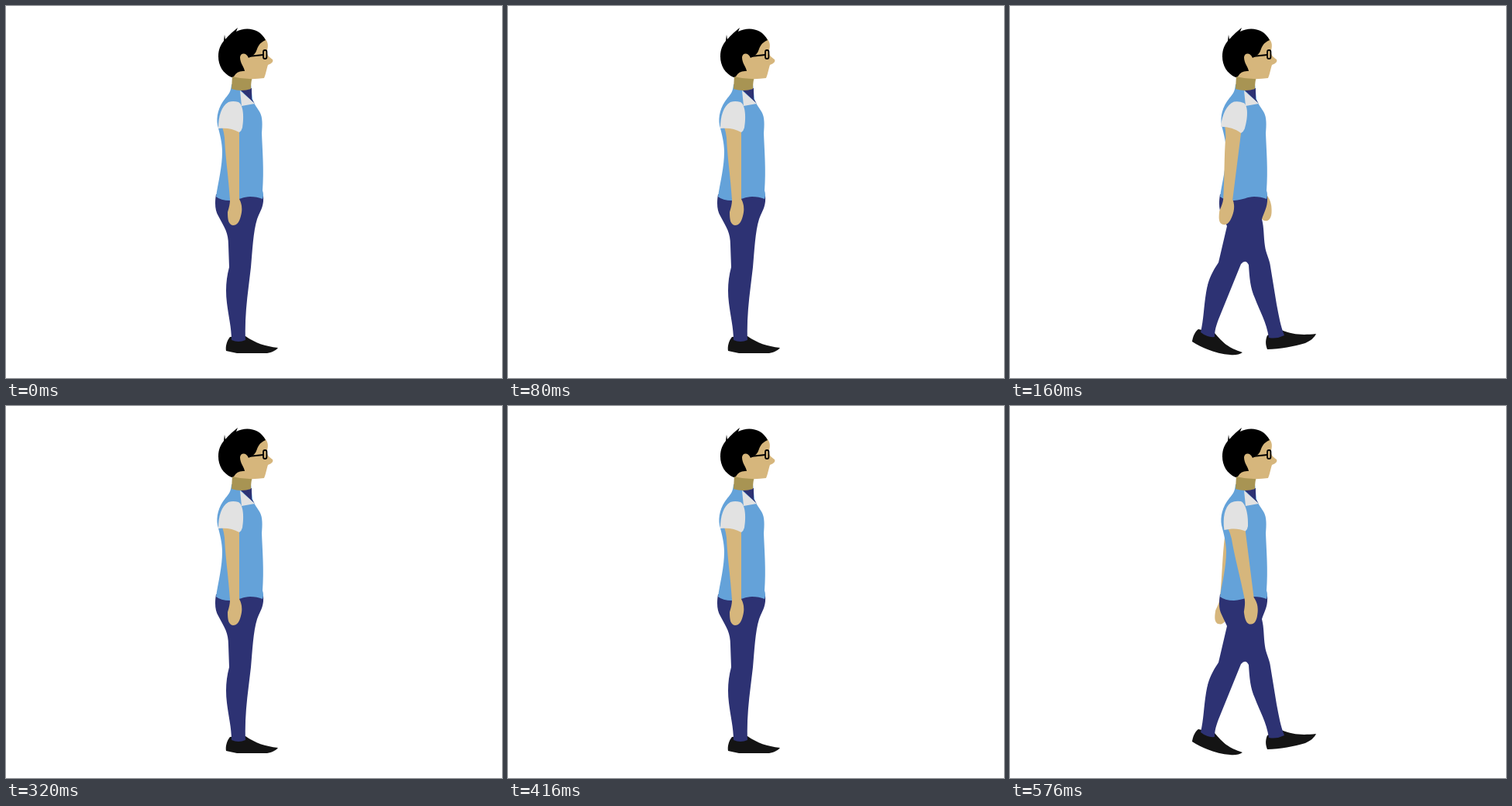
These frames come from a looping animation (640 by 480 pixels, 0.64 s). An HTML page:

```html
<!DOCTYPE html>
<html lang="en">
<head>
<meta charset="utf-8">
<title>Walking man</title>
<style>
  html, body { margin: 0; width: 100%; height: 100%; overflow: hidden; background: #fff; }
  svg { display: block; width: 100%; height: 100%; }
  .skin { fill: #d6b67c; }
  .navy { fill: #2d3273; }
  .blue { fill: #64a2d9; }
  .pale { fill: #e2e2e2; }
  .shoe { fill: #141414; }
</style>
</head>
<body>
<svg viewBox="0 0 640 480">
  <defs>
    <path id="limb" class="skin" d="M279 150 L301 150 L301 249 C305 256 305 264 303 271 C301 279 298 283 293 283 C287 282 286 276 286 266 C287 262 289 257 289 250 C287 220 283 195 282 170 Q281 162 279 156Z"/>
  </defs>

  <use id="farArm" href="#limb"/>

  <g id="stand">
    <path class="shoe" d="M289 427 C285 432 283 439 284 445 L298 448 H337 C343 447 349 444 351 441 C334 439 322 435 309 426Z"/>
    <path class="navy" d="M271 243 C269 256 270 264 274 271 C282 286 287 292 287 309 L288 337 C284 352 283 367 285 383 C287 400 291 415 291 431 Q300 435 309 431 C308 410 310 385 313 362 L316 337 C318 315 319 291 324 275 C328 264 333 259 332 245Z"/>
  </g>

  <g id="stride">
    <path class="shoe" d="M243 417 C238 421 236 427 235 433 C249 442 268 449 284 450 Q294 451 300 447 C282 441 275 435 264 422Z"/>
    <path class="shoe" d="M332 425 C329 432 330 438 332 443 C348 443 367 439 381 435 Q392 430 395 423 C376 425 365 424 350 418Z"/>
    <path class="navy" d="M271 243 C269 256 270 263 273 269 L280 284 L269 331 C260 344 255 356 253 370 C250 388 250 404 246 421 Q254 428 264 427 C264 416 268 407 272 397 L298 333 Q304 326 308 334 C309 350 310 364 316 377 C322 393 331 408 334 428 Q344 430 354 425 C349 413 347 400 344 385 L336 336 C335 327 330 319 329 310 C327 296 328 287 325 275 C328 265 333 259 332 245Z"/>
  </g>

  <path class="blue" d="M291 101 C290 111 288 113 283 119 C274 130 271 143 273 154 C276 165 279 177 279 188 C279 208 274 226 271 246 Q277 251 289 251 C302 250 306 246 315 246 Q324 246 331 249 Q333 244 331 238 C333 211 331 190 330 164 C331 153 331 144 328 138 C325 132 320 127 318 120 L316 101Z"/>
  <path class="navy" d="M302 108 L317 106 V120 L321 126Z"/>
  <path class="pale" d="M302 109 L321 126 L304 129Z"/>
  <path fill="#a89453" d="M292 90 L318 92 Q316 97 316 107 Q304 111 291 107Z"/>

  <path class="skin" d="M331 40 C338 44 339 50 337 57 C336 64 340 66 344 69 Q346 73 338 76 C336 82 335 89 333 93 Q312 96 291 91 L300 50Z"/>
  <path d="M291 92 C280 87 274 77 274 65 C274 56 277 50 281 45 L282 37 L283 43 C288 37 294 32 299 28 L297 33 C310 26 328 29 335 44 C326 48 325 53 323 58 C321 63 317 65 313 67 C310 60 303 60 302 66 C302 74 307 78 308 84 Q298 83 294 91Z"/>
  <path fill="none" stroke="#000" stroke-width="1.8" d="M313 65 L332 63"/>
  <rect x="332" y="57" width="4.4" height="11" rx="2" fill="none" stroke="#000" stroke-width="1.8"/>

  <g id="nearArm">
    <use href="#limb"/>
    <path class="pale" d="M274 158 C274 142 278 129 287 124 Q293 122 300 124 C307 128 307 146 305 157 Q304 161 301 163 C293 158 284 157 274 158Z"/>
  </g>
</svg>
<script>
const $ = id => document.getElementById(id);
const STEP = 160;

// Arm angles in degrees about the shoulder, one pose per step
const poses = [
  { near: 0, far: 0 },
  { near: 7.2, far: -15.5, stride: true },
  { near: 0, far: 0 },
  { near: -7.2, far: 9.5, stride: true }
];

function swing(id, angle) {
  $(id).setAttribute("transform", `rotate(${angle} 291 140)`);
}

function show(id, on) {
  $(id).style.display = on ? "" : "none";
}

const start = performance.now();

function draw() {
  const t = performance.now() - start;
  const pose = poses[Math.floor(t / STEP) % poses.length];
  swing("nearArm", pose.near);
  swing("farArm", pose.far);
  show("farArm", pose.stride);
  show("stride", pose.stride);
  show("stand", !pose.stride);
  requestAnimationFrame(draw);
}
draw();
</script>
</body>
</html>
```
